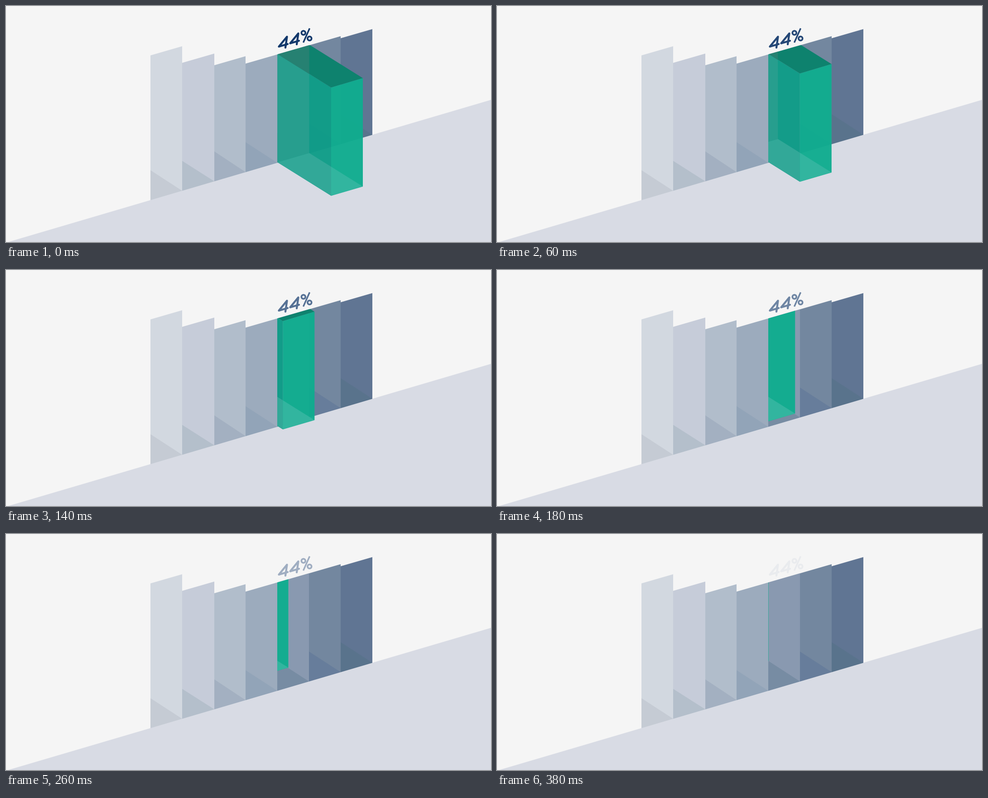
Recreate the animation shown at these times as a matplotlib script. Size 1071 by 523 pixels, loop 420 ms.

```python
import numpy as np
import matplotlib.pyplot as plt
from matplotlib.animation import FuncAnimation
from matplotlib.patches import Circle, Polygon

W, H, DPI = 1071, 523, 64
STEP, FRAMES = 20, 21
PX = 72 / DPI  # one pixel in points

SKY, FLOOR, NAVY = "#f5f5f5", "#d8dbe4", "#12386b"
EDGES = [319, 389, 460, 529, 599, 669, 739, 809]
TOPS = [109.5, 126, 131.3, 127.7, 107.3, 87.2, 71.5]
BARS = ["#d2d8e0", "#c6ccd9", "#b1bdcb", "#9cabbd", "#8999b0", "#73879f", "#607593"]
FOLDS = ["#c5cbd4", "#b4bfcb", "#a3b0c1", "#92a4b8", "#778ca3", "#677d9b", "#59738c"]

SLIDE = np.array([-189, -119.4])   # full travel of the box
DEPTH = np.array([118.5, 74.2])    # from its back to its front
TOP_LEFT, TOP_RIGHT = np.array([718, 180.7]), np.array([788, 159.8])
LOW_LEFT, LOW_RIGHT = np.array([718, 420.5]), np.array([788, 400])

fig = plt.figure(figsize=(W / DPI, H / DPI), dpi=DPI, facecolor=SKY)
ax = fig.add_axes([0, 0, 1, 1])
ax.set(xlim=(0, W), ylim=(H, 0))
ax.axis("off")


def shape(color, points=((0, 0),) * 3, **style):
    patch = Polygon(points, closed=True, facecolor=color, linewidth=0, snap=False, **style)
    return ax.add_patch(patch)


def floor_y(x):
    return 523 - 0.2955 * (x - 5)


def at_x(a, b, x):
    """Point on the line through a and b at the given x."""
    return np.array([x, a[1] + (b[1] - a[1]) * (x - a[0]) / (b[0] - a[0])])


shape(FLOOR, [(5, H), (W, floor_y(W)), (W, H)])
for left, right, top, bar, fold in zip(EDGES, EDGES[1:], TOPS, BARS, FOLDS):
    corner = (right, floor_y(right))
    base = (left, floor_y(left))
    shape(bar, [(left, top), (right, top - 0.29 * (right - left)), corner, base])
    shape(fold, [(left, base[1] - 66.3), corner, base])

# The box is only visible in front of the wall.
opening = Polygon([(599, 107.3), (W, 107.3 - 0.2885 * (W - 599)), (W, H), (599, H)],
                  transform=ax.transData)
faces = {
    "left": shape("#0e9d88", alpha=0.96),
    "left_open": shape("#279e8e"),
    "top": shape("#0e826e"),
    "top_open": shape("#268172"),
    "left_base": shape("#32a898"),
    "front": shape("#0fad8f", alpha=0.96),
    "front_base": shape("#32b59f"),
}
for face in faces.values():
    face.set_clip_path(opening)

label = []
for dx, dy in [(0, 0), (25, -7.3)]:
    four = np.array([(617, 92.3), (620.5, 68), (602.5, 90), (622, 84.3)]) + (dx, dy)
    label += ax.plot(*four.T, color=NAVY, lw=4.3 * PX,
                     solid_capstyle="round", solid_joinstyle="round")
label += ax.plot([670.5, 656.5], [49.5, 81], color=NAVY, lw=3.4 * PX, solid_capstyle="butt")
for center in [(656.8, 59.5), (670.3, 72)]:
    label.append(ax.add_patch(Circle(center, 4.4, fill=False, ec=NAVY, lw=3.6 * PX)))


def blend(start, end, amount):
    a, b = (np.array(plt.matplotlib.colors.to_rgb(c)) for c in (start, end))
    return tuple(a + (b - a) * amount)


def update(frame):
    t = min(frame * STEP, 380)
    p = max(t - 4, 0) / 400
    shift = SLIDE * (1 - (1 - p) ** 2)

    tl, tr, bl, br = (c + shift for c in (TOP_LEFT, TOP_RIGHT, LOW_LEFT, LOW_RIGHT))
    back_tl, back_tr, back_bl, back_br = (c - DEPTH for c in (tl, tr, bl, br))
    ridge = at_x(back_tl, tl, back_tr[0])
    crease = at_x(back_br, br, bl[0])

    outlines = {
        "left": [back_tl, tl, bl, back_bl],
        "left_open": [back_tl, ridge, back_br, back_bl],
        "top": [back_tl, back_tr, tr, tl],
        "top_open": [back_tl, back_tr, ridge],
        "left_base": [back_bl, back_br, crease, bl],
        "front": [tl, tr, br, bl],
        "front_base": [bl, crease, br],
    }
    for name, points in outlines.items():
        faces[name].set_xy(points)

    color = blend(NAVY, SKY, max(t - 30, 0) / 370)
    for part in label:
        if isinstance(part, Circle):
            part.set_edgecolor(color)
        else:
            part.set_color(color)
    return [*faces.values(), *label]


anim = FuncAnimation(fig, update, frames=FRAMES, interval=STEP, repeat=True, repeat_delay=0)
plt.show()
```
